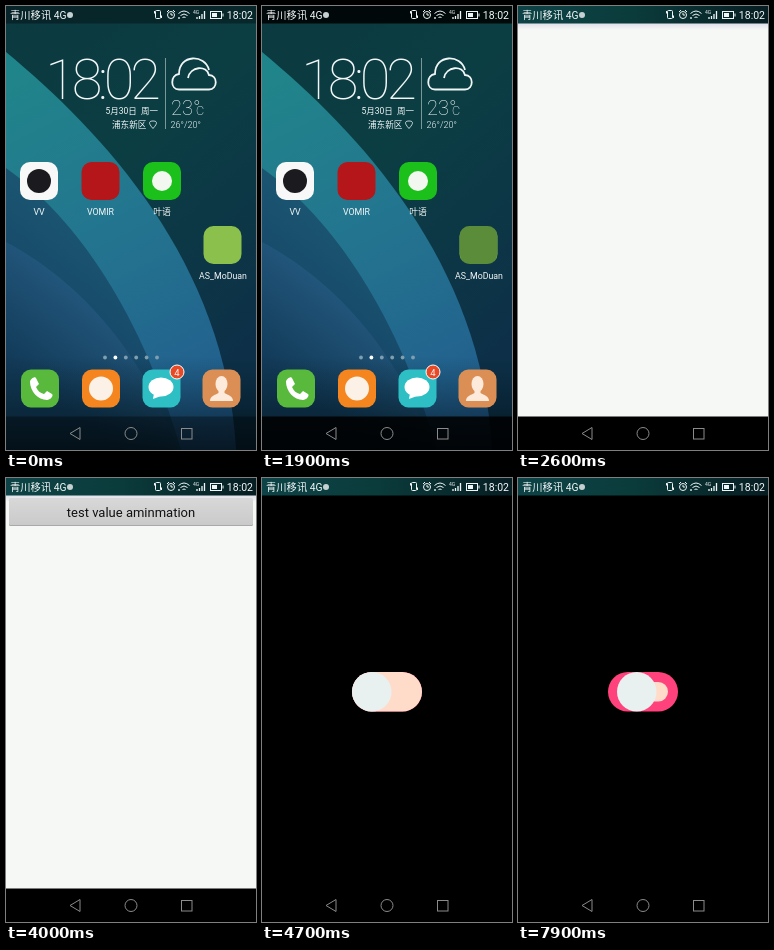
Animation, 250 px wide and 444 px high, one loop 8 s. Source, as an HTML page:

```html
<!DOCTYPE html>
<html lang="zh">
<head>
<meta charset="utf-8">
<title>Phone toggle</title>
<style>
html, body { margin: 0; height: 100%; overflow: hidden; background: #000; }
svg { display: block; width: 100vw; height: 100vh; }
text { font-family: Roboto, "Noto Sans CJK SC", "Noto Sans CJK", sans-serif; fill: #f4f7f7; }
.mid { text-anchor: middle; }
.line { fill: none; stroke: #f0f5f5; }
</style>
</head>
<body>
<svg viewBox="0 0 250 444" preserveAspectRatio="none">
  <defs>
    <linearGradient id="back" x2=".5" y2="1">
      <stop stop-color="#0b3940"/><stop offset=".45" stop-color="#0b3e43"/><stop offset="1" stop-color="#0d3048"/>
    </linearGradient>
    <linearGradient id="arc" gradientUnits="userSpaceOnUse" x1="20" y1="60" x2="200" y2="420">
      <stop stop-color="#20858a"/><stop offset=".45" stop-color="#23758f"/><stop offset="1" stop-color="#225c8e"/>
    </linearGradient>
    <linearGradient id="band" gradientUnits="userSpaceOnUse" x1="70" y1="190" x2="10" y2="270">
      <stop stop-color="#1b5872"/><stop offset="1" stop-color="#17496a"/>
    </linearGradient>
    <linearGradient id="fold" gradientUnits="userSpaceOnUse" x1="90" y1="280" x2="20" y2="370">
      <stop stop-color="#245a80"/><stop offset="1" stop-color="#123a58"/>
    </linearGradient>
    <linearGradient id="shade" x2="0" y2="1">
      <stop stop-color="#001218" stop-opacity="0"/><stop offset="1" stop-color="#00090d" stop-opacity=".65"/>
    </linearGradient>
    <linearGradient id="bar">
      <stop stop-color="#0d4346"/><stop offset=".45" stop-color="#0b3c3c"/><stop offset="1" stop-color="#061d22"/>
    </linearGradient>
    <linearGradient id="key" x2="0" y2="1"><stop stop-color="#d8d8d8"/><stop offset="1" stop-color="#cacaca"/></linearGradient>
    <linearGradient id="lip" x2="0" y2="1"><stop stop-color="#dddde8"/><stop offset="1" stop-color="#f6f8f6"/></linearGradient>
  </defs>

  <g id="home">
    <rect width="250" height="444" fill="url(#back)"/>
    <path d="M0 46C95 125 220 255 230 444H0z" fill="url(#arc)"/>
    <path d="M0 162C60 205 130 290 175 444H0z" fill="url(#band)"/>
    <path d="M0 236C60 268 130 330 172 444H0z" fill="url(#fold)"/>
    <rect y="350" width="250" height="94" fill="url(#shade)"/>
    <g id="bars"><rect width="250" height="17.500"/><rect y="410.500" width="250" height="34"/></g>

    <text x="95" y="92.500" class="mid" font-size="56" font-weight="100" letter-spacing="-4.2">18:02</text>
    <path d="M159.500 52V123" class="line" stroke-width=".7" opacity=".7"/>
    <text x="152" y="107.500" text-anchor="end" font-size="8.500">5月30日&#160; 周一</text>
    <text x="106" y="121.700" font-size="8.600" font-weight="500">浦东新区</text>
    <path d="M147 122.500C141 116 144 115 147 115S153 116 147 122.500z" class="line" stroke-width=".8"/>
    <path d="M173 83.500C164 83.500 164 69 173 68C173 48 199 48 203 64M182 72C184 60 201 59 203 69C212 69 212 83.500 203 83.500H173" class="line" stroke-width="1.800"/>
    <text x="165" y="108.500" font-size="20" font-weight="100">23°<tspan font-size="16" dx="-4.500">c</tspan></text>
    <text x="164.500" y="122" font-size="9" font-weight="300">26°/20°</text>

    <g id="apps"></g>
    <rect id="press" x="198" y="220" width="37" height="38" rx="9" fill="#123c1c"/>
    <g id="dots"></g>

    <path d="M24 376c0-3 5-6 6-4l3 6-3 3c2 4 4 6 8 7l3-3 5 3c2 2-2 6-5 6-9 0-17-9-17-18z" fill="#fff"/>
    <ellipse cx="155" cy="381" rx="12.500" ry="9.500" fill="#fff"/>
    <path d="M148 387l-1 6 8-3z" fill="#fff"/>
    <g fill="#fdeadb">
      <ellipse cx="215.500" cy="378" rx="6" ry="8"/>
      <path d="M204 395c0-5 5-6 8.500-8v-4h6v4c3.500 2 8.500 3 8.500 8z"/>
    </g>
    <circle cx="171" cy="366" r="7" fill="#e84a26" stroke="#fff"/>
    <text x="171" y="369.500" class="mid" font-size="9.500">4</text>
  </g>

  <g id="page">
    <rect y="17" width="250" height="394" fill="#f6f8f6"/>
    <rect y="17" width="250" height="7" fill="url(#lip)"/>
    <g id="button">
      <rect x="3" y="21" width="244" height="27" rx="1.500" fill="#a9a9a9"/>
      <rect id="face" x="3" y="20" width="244" height="27" rx="1.500" fill="url(#key)"/>
      <text x="125" y="39" class="mid" font-size="13" style="fill:#111">test value aminmation</text>
    </g>
  </g>

  <g id="stage">
    <rect y="17" width="250" height="394"/>
    <rect x="90" y="194" width="70" height="39.500" rx="19.750" fill="#ff417c"/>
    <rect id="inner" fill="#ffdcc9"/>
    <circle id="thumb" cy="213.750" r="19.750" fill="#e8f1ef"/>
  </g>

  <g id="chrome">
    <rect width="250" height="17.500" fill="url(#bar)"/>
    <rect y="410.500" width="250" height="34"/>
  </g>
  <g fill="none" stroke="#8b8b8b">
    <path d="M74 421.500V433.500L64 427.500z"/><circle cx="125" cy="427.500" r="6"/><rect x="175.500" y="422.500" width="10.500" height="10.500"/>
  </g>

  <text x="4" y="12.700" font-size="10.300">青川移讯 4G</text>
  <circle cx="64" cy="9" r="3" fill="#c5d0d0"/>
  <g class="line" stroke-width="1">
    <rect x="149.500" y="4.500" width="5" height="8" rx="1"/>
    <path d="M148.500 5v2.500M155.500 9.500v2.500"/>
    <circle cx="165" cy="9" r="3.500"/><path d="M165 7v2h2M161 6l2-2M169 6l-2-2"/>
    <path d="M172.500 7.500q5.500-5 11 0M174.500 9.500q3.500-3 7 0M176.500 11.500q1.500-1 3 0"/>
    <path d="M191 13v-2M193.500 13v-3M196 13V8M198.500 13V5M173 13v-2" stroke-width="1.300"/>
    <rect x="204.500" y="5.500" width="11" height="7"/><path d="M217 7.500v3"/>
  </g>
  <rect x="206" y="7" width="5" height="4" fill="#f0f5f5"/>
  <text x="187" y="7.500" font-size="5">4G</text>
  <text x="247" y="13" text-anchor="end" font-size="10.500">18:02</text>
</svg>
<script>
const $ = id => document.getElementById(id);
const set = (id, attrs) => { for (const k in attrs) $(id).setAttribute(k, attrs[k]); };
const clamp = v => Math.max(0, Math.min(1, v));
const easeOut = v => 1 - (1 - clamp(v)) ** 2;

const tile = (x, y, fill) =>
  `<rect x="${x - 19}" y="${y - 19}" width="38" height="38" rx="10" fill="${fill}"/>`;
const label = (x, y, name) => `<text x="${x}" y="${y}" class="mid" font-size="8.800">${name}</text>`;
const disc = (x, y, r, fill) => `<circle cx="${x}" cy="${y}" r="${r}" fill="${fill}"/>`;

$('apps').innerHTML =
  tile(33, 175, '#f8f8f8') + disc(33, 175, 12, '#1b1b1f') + label(33, 208.5, 'VV') +
  tile(94.5, 175, '#b5161a') + label(94.5, 208.5, 'VOMIR') +
  tile(156, 175, '#1cc01a') + disc(156, 175, 10, '#f2f8f0') + label(156, 208.5, '叶语') +
  tile(216.5, 239, '#8bc04c') + label(217, 273, 'AS_MoDuan') +
  tile(34, 382.5, '#58b93c') +
  tile(95, 382.5, '#f5851f') + disc(95, 382.5, 12, '#fbf1e6') +
  tile(155.5, 382.5, '#2dbfc4') + tile(215.5, 382.5, '#dc8f54');
$('dots').innerHTML = [0, 1, 2, 3, 4, 5]
  .map(i => disc(99 + i * 10.4, 351.5, 1.9, i === 1 ? '#fff' : '#7f9fb0')).join('');

function draw(t) {
  // launcher icon press, then the window grows out of the icon
  const press = clamp((t - 1500) / 300);
  const open = easeOut((t - 1900) / 220);
  set('press', { opacity: 0.4 * press });
  set('bars', { opacity: 0.35 + 0.5 * press });
  set('page', {
    opacity: open > 0 ? 1 : 0,
    transform: `translate(213 239) scale(${open}) translate(-213 -239)`
  });
  set('chrome', { opacity: clamp((t - 1900) / 200) });
  set('button', { opacity: t >= 3100 ? 1 : 0 });
  set('face', { fill: t >= 3800 && t < 4000 ? '#b4b4b4' : 'url(#key)' });

  // second screen slides in
  const slide = easeOut((t - 4200) / 500);
  set('stage', { transform: `translate(${250 * (1 - slide)} 0)` });

  // toggle: inner pill shrinks while the thumb moves right
  const on = t < 7700 ? 0 : t < 7900 ? 0.1 : 1;
  const inset = 10 * on;
  const h = 39.5 - 2 * inset;
  set('inner', { x: 90 + inset, y: 194 + inset, width: 70 - 2 * inset, height: h, rx: h / 2 });
  set('thumb', { cx: 109.75 + 9 * on });
}

const start = performance.now();
function tick() {
  const t = (performance.now() - start) % 8000;
  draw(Math.floor(t / 100) * 100);
  requestAnimationFrame(tick);
}
tick();
</script>
</body>
</html>
```
